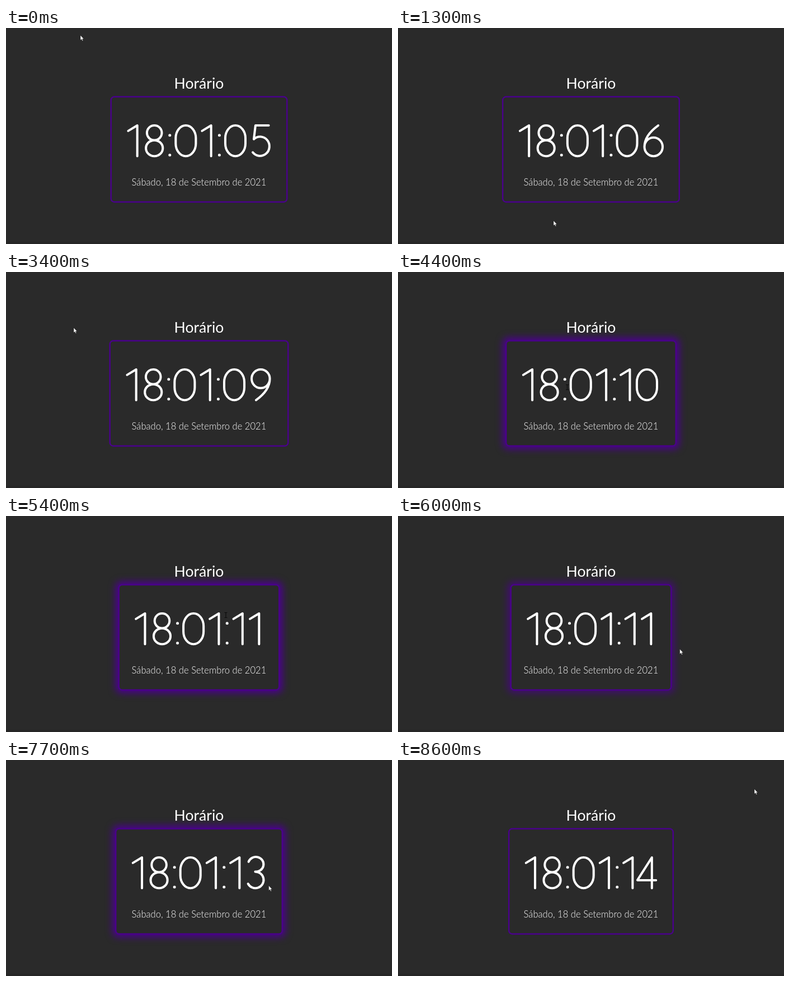
An HTML page that plays this animation: 690 px wide and 388 px high, repeating every 9000 ms.

```html
<!DOCTYPE html>
<html lang="pt-BR">
<head>
<meta charset="utf-8">
<title>Horário</title>
<style>
  html, body { margin: 0; width: 100%; height: 100%; overflow: hidden; background: #2a2a2a; }
  svg { display: block; width: 690px; height: 388px; }
  text { font-family: Lato, "Open Sans", sans-serif; fill: #fff; text-anchor: middle; }
  #title { font-size: 26.6px; }
  #date { font-size: 16.6px; font-weight: 300; }
  #label { font-size: 80px; font-weight: 300; fill: transparent; }
  #glow { fill: #4b0090; filter: blur(6.5px); }
  #box { fill: #2a2a2a; stroke: #4a008c; stroke-width: 2.4px; }
  #time { fill: none; stroke: #fff; stroke-width: 4.1px; stroke-linecap: round; stroke-linejoin: round; }
  #arrow { fill: #fff; stroke: #111; stroke-width: .5px; }
  #beam { fill: none; stroke: #0c0c0c; stroke-width: 1.1px; }
</style>
</head>
<body>
<svg viewBox="0 0 690 388">
  <rect y="384" width="690" height="4" fill="#262626"/>
  <rect id="glow" y="118" height="200" rx="9"/>
  <rect id="box" y="123.5" height="189" rx="6"/>
  <text id="title" x="345" y="109">Horário</text>
  <text id="label" x="345" y="232"></text>
  <g id="time" aria-hidden="true" transform="translate(345 202.6) scale(.985)"></g>
  <text id="date" x="345" y="283.4">Sábado, 18 de Setembro de 2021</text>
  <path id="arrow" d="M0 0V9L2 7.2L3.5 10.3L4.9 9.7L3.5 6.7H6.2Z"/>
  <path id="beam" d="M-2.5-4.5H2.5M0-4.5V4.5M-2.5 4.5H2.5"/>
</svg>
<script>
const LOOP = 9000, STEP = 100, FADE = 200, MID = 345, PAD = 26;
const el = id => document.getElementById(id);

// Monoline numerals, centred on y = 0 and 56 units tall
const oval = (cx, cy, rx, ry) =>
  `M${cx - rx} ${cy}a${rx} ${ry} 0 1 1 ${2 * rx} 0a${rx} ${ry} 0 1 1 ${-2 * rx} 0`;

// A bowl with a tail: 6 upright, 9 turned by half a circle
const hook = s => {
  const at = (x, y) => `${21.5 + s * x} ${s * y}`;
  return `M${at(8.5, -28)}Q${at(-16.5, -10)} ${at(-16.5, 11)}` + oval(21.5, s * 11, 16.5, 17);
};

const GLYPHS = {
  0: [47, 'M2.2-5a18.3 23 0 0 1 36.6 0v10a18.3 23 0 0 1-36.6 0z'],
  1: [30, 'M3-18L19.5-28V28'],
  2: [43, 'M6-14A14.5 14 0 0 1 35-14Q35-5 24 6L6 28H36.5'],
  3: [41, 'M6-20A14 13.5 0 1 1 18-2A15 15 0 1 1 5 20'],
  4: [37, 'M24.5 28V-28L-1.8 13.5H32'],
  5: [41, 'M34-28H10L7-3A17 17.5 0 1 1 5 21'],
  6: [42, hook(1)],
  7: [38, 'M4-28H34L14 28'],
  8: [44, oval(20.5, -14.5, 13.5, 13.5) + oval(20.5, 13.5, 15.3, 14.5)],
  9: [45, hook(-1)],
  ':': [13, oval(4.5, -10, .5, .5) + oval(4.5, 26, .5, .5)]
};

// Pointer stops: [arrive, leave, x, y]
const STOPS = [
  [0, 0, 133, 13], [600, 600, 160, 230], [1300, 1700, 278, 346], [1800, 2600, -3, 92],
  [2800, 2800, 217, 272], [3000, 3100, 74, 162], [3400, 3900, 121, 100], [4400, 4400, 302.5, 207],
  [5100, 5400, 393, 178], [6350, 6350, 551, 265], [6700, 6700, 452.5, 254], [7800, 7800, 470, 225],
  [8500, LOOP, 637, 52]
];

const ease = p => (1 - Math.cos(Math.PI * p)) / 2;

function pointer(t) {
  const i = STOPS.findLastIndex(s => s[0] <= t);
  const [, leave, x, y] = STOPS[i];
  if (t <= leave) return [x, y];
  const [arrive, , nx, ny] = STOPS[i + 1];
  const p = ease((t - leave) / (arrive - leave));
  return [x + (nx - x) * p, y + (ny - y) * p];
}

const clock = t => '18:01:' + String(5 + Math.floor((t + 600) / 1000)).padStart(2, '0');
const span = str => [...str].reduce((sum, c) => sum + GLYPHS[c][0], 0);

function within([x, y], half, top, bottom) {
  return Math.abs(x - MID) < half && y > top && y < bottom;
}

// Share of the last FADE ms that the pointer spent over the clock
function glow(t) {
  const n = 10;
  let hits = 0;
  for (let i = 0; i < n; i++) {
    const u = Math.max(0, t - FADE * i / n);
    hits += within(pointer(u), span(clock(u)) / 2 + PAD, 123, 245);
  }
  return hits / n;
}

function setSpan(id, width) {
  el(id).setAttribute('x', MID - width / 2);
  el(id).setAttribute('width', width);
}

function setTime(str) {
  if (str === el('label').textContent) return;
  const total = span(str);
  let x = 1 - total / 2;
  el('time').innerHTML = [...str].map(c => {
    const [advance, d] = GLYPHS[c];
    const path = `<path d="${d}" transform="translate(${x})"/>`;
    x += advance;
    return path;
  }).join('');
  el('label').textContent = str;
  setSpan('box', total + PAD * 2 - 2.4);
  setSpan('glow', total + PAD * 2 + 9);
}

function draw(t) {
  const str = clock(t), pos = pointer(t);
  setTime(str);
  el('glow').style.opacity = glow(t);
  const onText = within(pos, span(str) / 2 - 7, 150, 290);
  for (const id of ['arrow', 'beam']) {
    el(id).setAttribute('transform', `translate(${pos})`);
    el(id).style.display = (id === 'beam') === onText ? '' : 'none';
  }
}

const start = performance.now();
function tick() {
  const t = (performance.now() - start) % LOOP;
  draw(Math.floor(t / STEP) * STEP);
  requestAnimationFrame(tick);
}
tick();
</script>
</body>
</html>
```
